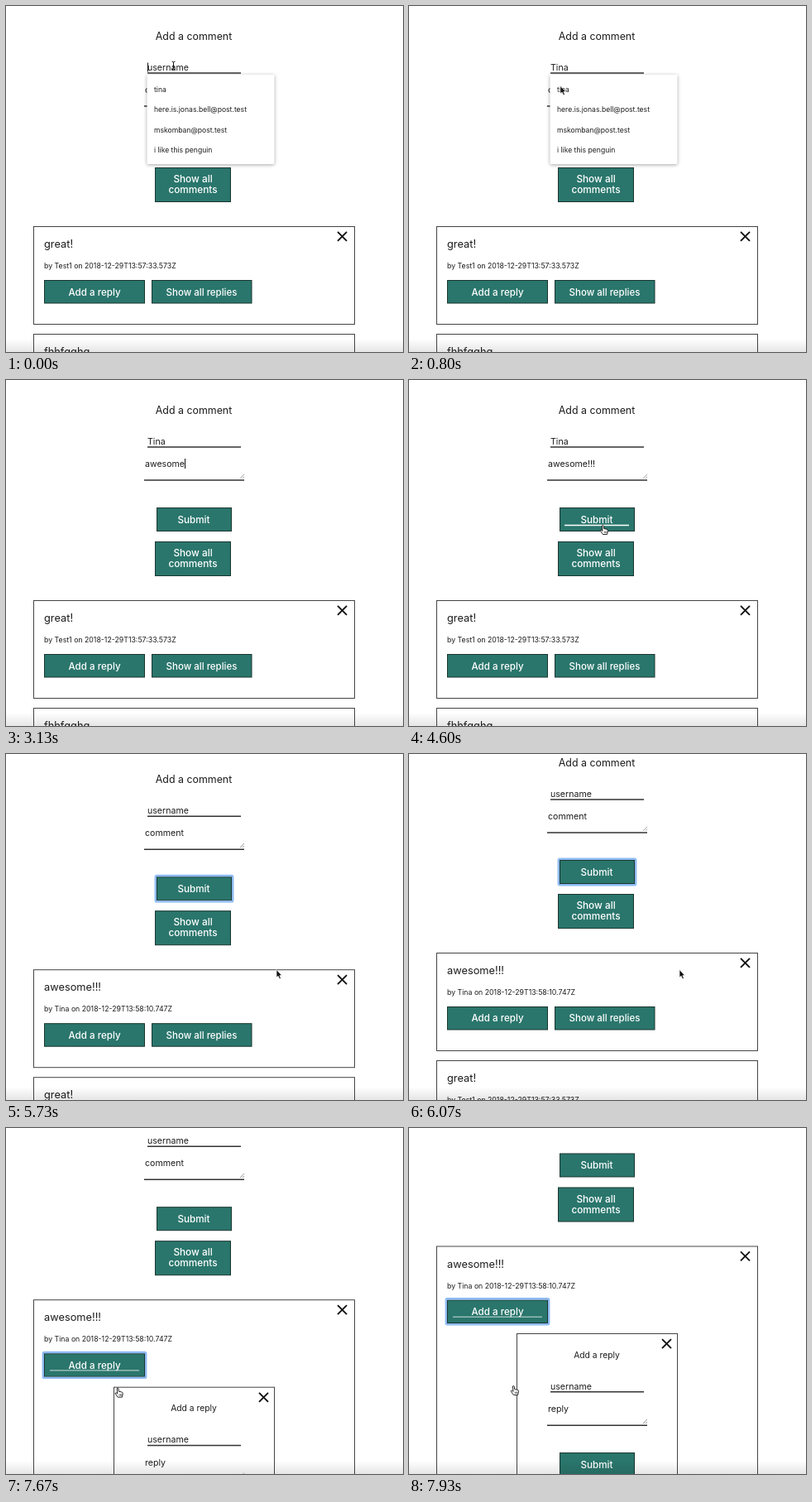
These frames come from a looping animation (480x418 px, 8 s). An HTML page:

```html
<!DOCTYPE html>
<html lang="en">
<head>
<meta charset="utf-8">
<title>Comment form</title>
<style>
  html, body { margin: 0; width: 100%; height: 100%; overflow: hidden; background: #fff; }
  svg { display: block; width: 100vw; height: 100vh; }
  text { font-family: Inter, "Open Sans", sans-serif; fill: #1c1c1c; white-space: pre; }
  .mid { text-anchor: middle; }
  .label { fill: #fff; font-weight: 500; text-anchor: middle; }
  .button { fill: #2a766c; stroke: #1a3630; }
  .frame { fill: #fff; stroke: #444; }
  .rule { stroke: #333; stroke-width: 1.5; }
  .cross { stroke: #111; stroke-width: 1.9; fill: none; }
  .ring { fill: none; stroke: #8dbaf3; stroke-width: 2.4; }
  .grip { stroke: #777; stroke-width: .7; fill: none; }
  .caret { stroke: #111; }
  .menu { filter: drop-shadow(0 1px 2px rgba(0, 0, 0, .35)); }
</style>
</head>
<body>
<svg viewBox="0 0 480 418" preserveAspectRatio="none">
  <defs>
    <linearGradient id="fade" x2="0" y2="1">
      <stop offset="0" stop-color="#000" stop-opacity="0"/>
      <stop offset="1" stop-color="#000" stop-opacity=".1"/>
    </linearGradient>
  </defs>
  <g id="page"></g>
  <rect y="402" width="480" height="16" fill="url(#fade)"/>
  <g id="cursor">
    <path id="beam" d="M-2-5Q0-5 0-3.5Q0-5 2-5M0-3.5V3.5M-2 5Q0 5 0 3.5Q0 5 2 5M-1 1.5H1" fill="none" stroke="#111"/>
    <path id="arrow" d="M-3-5.5V4L-.9 2.2.7 5.8 2.4 5 .9 1.6H3.6Z" fill="#111" stroke="#fff" stroke-width=".7"/>
    <g id="hand" stroke="#111" stroke-width=".9" stroke-linejoin="round">
      <path d="M-2.6-5Q-1.7-6.4-.8-5L-.3-1.4 2.9-.8Q4.6-.3 4.5 1.2L3.6 5.5H-1.6L-4.6 1.3Q-4.8-.1-3.4.2L-2 1.4Z" fill="#fff"/>
      <path d="M.2 1.6V4M1.7 1.6V4M3 1.6V4" stroke-width=".6"/>
    </g>
  </g>
</svg>
<script>
const LOOP = 8000;
const $ = id => document.getElementById(id);

// Markup helpers
const text = (x, y, size, str, cls = '', id = '') =>
  `<text x="${x}" y="${y}" font-size="${size}" class="${cls}" id="${id}">${str}</text>`;
const rect = (x, y, w, h, cls, id = '') =>
  `<rect x="${x}" y="${y}" width="${w}" height="${h}" class="${cls}" id="${id}"/>`;
const path = (d, cls, id = '') => `<path d="${d}" class="${cls}" id="${id}"/>`;
const cross = (x, y) => path(`M${x - 5.5} ${y - 5.5}l11 11m0-11l-11 11`, 'cross');
const ring = (x, y, w, h, id) =>
  `<rect x="${x - 1.2}" y="${y - 1.2}" width="${w + 2.4}" height="${h + 2.4}" rx="1.5" class="ring" id="${id}"/>`;
const grip = y => path(`M283 ${y - 2}l5-5M286 ${y - 2}l2-2`, 'grip');
const submit = y => rect(182.5, y, 90, 28, 'button') + text(227, y + 18.4, 11.7, 'Submit', 'label');

const fields = (y, area, areaGap, ids) =>
  text(171, y, 10.6, 'username', '', ids[0]) + path(`M171 ${y + 3.2}H284`, 'rule') +
  text(168, y + areaGap, 10.6, area, '', ids[1]) +
  path(`M167 ${y + areaGap + 16.2}H288`, 'rule') + grip(y + areaGap + 16);

const card = (y, title, by, key = '') =>
  rect(33.5, y - .5, 388, 118, 'frame', key + 'Frame') +
  text(46, y + 25, 12.8, title) + text(46, y + 50, 8.75, by) +
  rect(46.5, y + 64.5, 121, 27.5, 'button') + text(107, y + 82.5, 11.6, 'Add a reply', 'label') +
  `<g id="${key}Replies">` + rect(176.5, y + 64.5, 120.5, 27.5, 'button') +
  text(236.5, y + 82.5, 11.5, 'Show all replies', 'label') + '</g>';

const menuItems = ['tina', 'here.is.jonas.bell@post.test', 'mskomban@post.test', 'i like this penguin'];

$('page').innerHTML =
  text(227, 41.3, 12.4, 'Add a comment', 'mid') +
  fields(77.8, 'comment', 27, ['user', 'note']) +
  submit(154.5) + ring(182, 154, 91, 29, 'submitRing') +
  '<path id="submitLine" stroke="#fff" stroke-width="1.5"/>' +
  rect(180.5, 195.5, 91, 41, 'button') +
  text(226, 213, 11.8, 'Show all', 'label') + text(226, 226.3, 11.8, 'comments', 'label') +
  '<g id="fresh">' + card(267, 'awesome!!!', 'by Tina on 2018-12-29T13:58:10.747Z', 'fresh') +
  ring(46, 331, 122, 28.5, 'replyRing') +
  '<path id="replyLine" stroke="#fff" stroke-opacity=".75"/>' +
  '<g id="replyForm">' + rect(130.5, 372, 194, 240, 'frame') + cross(311.5, 384.2) +
  text(227, 401, 10.3, 'Add a reply', 'mid') +
  fields(439, 'reply', 27.5, ['replyUser', 'replyNote']) + submit(516) + '</g></g>' +
  '<g id="old">' + card(267, 'great!', 'by Test1 on 2018-12-29T13:57:33.573Z', 'first') +
  card(397, 'fhhfgghg', 'by Test1 on 2018-12-29T13:55:12.318Z', 'second') + '</g>' +
  cross(406.5, 278.4) + // only the newest card can be closed
  path('', 'caret', 'caret') +
  '<g id="menu" class="menu"><path d="M170.5 83H324.5V189Q324.5 191 322.5 191H172.5Q170.5 191 170.5 189Z" fill="#fff"/>' +
  menuItems.map((s, i) => text(179, 104 + i * 24.3, 8.6, s)).join('') + '</g>';

// Timings: [ms, ...values]
const pointer = [
  [270, 202.5, 72], [600, 187, 101], [800, 186, 102], [1070, 154, 104], [1130, 154, 104],
  [1470, 181.5, 104.5], [4000, 181.5, 104.5], [4530, 236, 181], [4930, 236, 181], [5200, 330, 266],
  [6470, 330, 266], [6850, 141.5, 321], [7330, 141.5, 321], [7530, 141, 321], [7900, 128, 317]
];
const pointerKind = [
  [0, 'beam'], [400, 'arrow'], [1250, 'beam'], [2330, ''], [4000, 'beam'],
  [4200, 'arrow'], [4330, 'hand'], [5000, 'arrow'], [6680, 'hand']
];
const scroll = [[5600, 0], [5800, 8], [6070, 26], [6400, 33], [7530, 33], [7930, 123.5]];
const submitHover = [[4300, 0], [4530, 1], [4970, 1], [5170, 0]];
const replyHover = [[6680, 0], [6860, 1]];
const menuFade = [[870, 1], [1000, 0]];
const typed = [
  [0, 'comment'], [2330, 'a'], [2600, 'aw'], [2670, 'awe'], [2870, 'awes'], [2930, 'aweso'],
  [3000, 'awesom'], [3130, 'awesome'], [3470, 'awesome!'], [3670, 'awesome!!'],
  [3800, 'awesome!!!'], [4800, 'comment']
];
const userValue = [[0, 'username'], [800, 'Tina'], [4800, 'username']];
const caretPlace = [[0, 'user'], [800, ''], [1600, 'start'], [1800, ''], [2330, 'end'], [4330, '']];

const held = (table, t) => table.reduce((v, row) => t >= row[0] ? row[1] : v, table[0][1]);

function eased(table, t) {
  const next = table.findIndex(row => row[0] > t);
  if (next < 0) return table[table.length - 1].slice(1);
  if (next === 0) return table[0].slice(1);
  const a = table[next - 1], b = table[next];
  const p = (t - a[0]) / (b[0] - a[0]), k = p * p * (3 - 2 * p);
  return a.slice(1).map((v, i) => v + (b[i + 1] - v) * k);
}

const show = (id, on) => $(id).style.display = on ? '' : 'none';
const setText = (id, s) => { if ($(id).textContent !== s) $(id).textContent = s; };

function underline(id, center, half, y, amount) {
  show(id, amount > 0);
  $(id).setAttribute('d', `M${center - half * amount} ${y}H${center + half * amount}`);
}

function drawCaret(t) {
  const place = held(caretPlace, t);
  show('caret', place);
  if (place === 'user') $('caret').setAttribute('d', 'M171.5 68.5V79.5');
  else {
    const x = place === 'end' ? 168.5 + $('note').getComputedTextLength() : 168.5;
    $('caret').setAttribute('d', `M${x} 95V107`);
  }
}

function draw(t) {
  const posted = t >= 4800, replying = t >= 7330, clicked = t >= 7200;
  setText('user', held(userValue, t));
  setText('note', held(typed, t));
  drawCaret(t);

  const menu = eased(menuFade, t)[0];
  show('menu', menu > 0);
  $('menu').style.opacity = menu;

  show('fresh', posted);
  show('submitRing', posted && !clicked);
  show('replyRing', clicked);
  show('replyForm', replying);
  show('freshReplies', !replying);
  $('freshFrame').setAttribute('height', replying ? 370 : 118);
  $('old').setAttribute('transform', `translate(0 ${replying ? 382 : posted ? 130 : 0})`);
  underline('submitLine', 227, 39, 175.5, eased(submitHover, t)[0]);
  underline('replyLine', 107, 54, 351.7, eased(replyHover, t)[0]);
  $('page').setAttribute('transform', `translate(0 ${-eased(scroll, t)[0]})`);

  const kind = held(pointerKind, t);
  for (const name of ['beam', 'arrow', 'hand']) show(name, name === kind);
  $('cursor').setAttribute('transform', `translate(${eased(pointer, t).join(' ')})`);
}

const start = performance.now();
function tick() {
  draw((performance.now() - start) % LOOP);
  requestAnimationFrame(tick);
}
tick();
</script>
</body>
</html>
```
